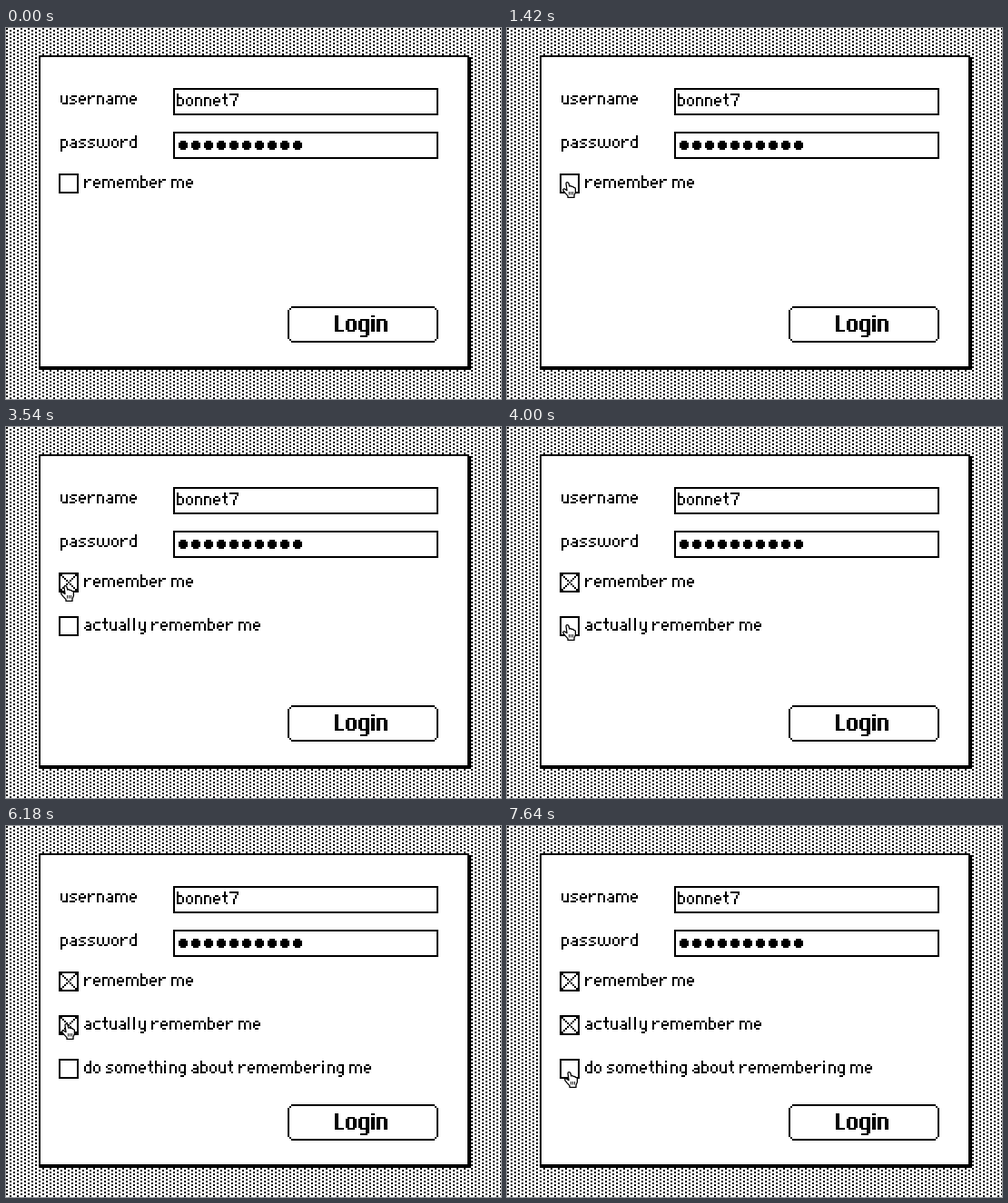
Animation of 545 by 408 pixels, one loop 8000 ms. Source, as an HTML page with a canvas:

```html
<!DOCTYPE html>
<html lang="en">
<head>
<meta charset="utf-8">
<title>Login form</title>
<style>
  html, body { margin: 0; width: 100%; height: 100%; overflow: hidden; background: #fff; }
  canvas { display: block; }
</style>
</head>
<body>
<canvas id="stage" width="545" height="408"></canvas>
<script>
const LOOP = 8000;
const U = 2; // size of one big pixel
const canvas = document.getElementById('stage');
const ctx = canvas.getContext('2d');

// Pixel font built from shared stems, bars, bowls and arches.
// p: pen width, xh: x-height, up: ascender, o: letter width
function makeFont(p, xh, up, o) {
  const last = xh - 1, low = xh + p, mid = xh >> 1;
  const stem = (x, y = 0, end = xh) => [x, y, p, end - y];
  const bar = (x, y, w) => [x, y, w, 1];
  const arch = x => [bar(x + p, 0, o - p - 1), stem(x + o - p, 1)];
  const left = stem(0, 1, last), right = stem(o - p, 1, last);
  const caps = [bar(1, 0, o - 2), bar(1, last, o - 2)];
  const tall = stem(0, -up);
  const cup = [stem(0, 0, last), bar(1, last, o - 2)];
  const tail = [stem(o - p, 0, low), bar(1, low, o - 2)];
  // each glyph: width, then its rectangles
  return {
    xh,
    ' ': [1],
    a: [o, ...caps, stem(o - p, 1), bar(1, mid, o - 2), stem(0, mid + 1, last)],
    b: [o, tall, right, ...caps],
    c: [o, left, bar(1, 0, o - 1), bar(1, last, o - 1)],
    d: [o, left, ...caps, stem(o - p, -up)],
    e: [o, left, ...caps, stem(o - p, 1, mid), bar(0, mid, o)],
    g: [o, left, ...caps, ...tail],
    h: [o, tall, ...arch(0)],
    i: [2, stem(0), [0, -2, p, 1]],
    l: [2, tall],
    m: [2 * o - 1, stem(0), ...arch(0), ...arch(o - 1)],
    n: [o, stem(0), ...arch(0)],
    o: [o, left, right, ...caps],
    p: [o, stem(0, 0, low + 1), right, ...caps],
    r: [o, stem(0), bar(1, 1, 1), bar(2, 0, 2)],
    s: [o, bar(1, 0, 3), bar(0, 1, 1), bar(1, 2, 2), bar(3, 3, 1), bar(0, 4, 3)],
    t: [3, stem(1, -up, last), bar(0, 0, 3), bar(2, last, 1)],
    u: [o, ...cup, stem(o - p)],
    w: [7, stem(0, 0, last), stem(3, 0, last), stem(6, 0, last), bar(1, last, 2), bar(4, last, 2)],
    y: [o, ...cup, ...tail],
    L: [5, tall, bar(p, last, 5 - p)],
    7: [5, bar(0, -up, 5), stem(4, 1 - up, 0), stem(3, 0, 2), stem(2, 2)]
  };
}

const plain = makeFont(1, 5, 2, 4);
const bold = makeFont(2, 7, 2, 6);

function write(text, x, base, font = plain) {
  const top = base - font.xh * U;
  for (const ch of text) {
    const [width, ...parts] = font[ch];
    for (const [px, py, w, h] of parts) ctx.fillRect(x + px * U, top + py * U, w * U, h * U);
    x += (width + 1) * U;
  }
}

function frame(x, y, w, h) {
  ctx.fillRect(x, y, w, h);
  ctx.fillStyle = '#fff';
  ctx.fillRect(x + U, y + U, w - 2 * U, h - 2 * U);
  ctx.fillStyle = '#000';
}

function bullet(x, y) {
  ctx.fillRect(x + U, y, 3 * U, 5 * U);
  ctx.fillRect(x, y + U, 5 * U, 3 * U);
}

// frame with stepped corners
function button(x, y, w, h) {
  for (const far of [0, 1]) {
    ctx.fillRect(x + 2 * U, y + far * (h - U), w - 4 * U, U);
    ctx.fillRect(x + far * (w - U), y + 2 * U, U, h - 4 * U);
    for (const low of [0, 1]) {
      ctx.fillRect(x + U + far * (w - 3 * U), y + U + low * (h - 3 * U), U, U);
    }
  }
}

function checkRow(y, label, checked) {
  frame(58, y, 22, 22);
  if (checked) {
    for (let i = 1; i < 10; i++) {
      ctx.fillRect(58 + i * U, y + i * U, U, U);
      ctx.fillRect(58 + (10 - i) * U, y + i * U, U, U);
    }
  }
  write(label, 86, y + 16);
}

// light grey: every fourth pixel, alternate rows shifted by two
function makeGrey() {
  const tile = document.createElement('canvas');
  tile.width = 4 * U;
  tile.height = 2 * U;
  const c = tile.getContext('2d');
  c.fillStyle = '#fff';
  c.fillRect(0, 0, tile.width, tile.height);
  c.fillStyle = '#000';
  c.fillRect(0, 0, U, U);
  c.fillRect(2 * U, U, U, U);
  return ctx.createPattern(tile, 'repeat');
}
const grey = makeGrey();

const arrowShape = new Path2D('M0 0V13L3 10.2L5.2 15.3L7.4 14.4L5.3 9.5H9.3Z');
const handShape = new Path2D(
  'M4 2Q4 .6 5.3 .6Q6.6 .6 7 2L7.8 5Q9.4 4 10.1 5.5Q11.8 4.8 12.4 6.4Q14.4 6 14.4 8.2' +
  'V11.5L13 15V17.4H6V15.6L3.2 12.6L.8 9.6Q.3 7.6 2.2 7.8L5 9.6Z');
const knuckles = new Path2D('M7.5 11V14.5M9.5 11V14.5M11.5 11V14.5');

const easeOut = k => 1 - (1 - k) ** 2;
const easeInOut = k => k * k * (3 - 2 * k);

const moves = [
  { from: 20, to: 610, a: [-9, 181], b: [67, 169], ease: easeOut, bow: 0 },
  { from: 760, to: 761, a: [67, 169], b: [66, 169], ease: easeOut, bow: 0 },
  { from: 3420, to: 4000, a: [66, 169], b: [66, 217], ease: easeInOut, bow: -4 },
  { from: 6750, to: 7550, a: [66, 217], b: [70, 270], ease: easeInOut, bow: 0 },
  { from: 7610, to: 7611, a: [70, 270], b: [68, 270], ease: easeOut, bow: 0 }
];
const arrowTimes = [[0, 1420], [2200, 2230], [3620, 3980], [5920, 5950], [7020, 7625]];

function cursorAt(t) {
  const m = moves.filter(s => t >= s.from).pop();
  const k = m.ease(Math.min(1, (t - m.from) / (m.to - m.from)));
  const mix = i => m.a[i] + (m.b[i] - m.a[i]) * k;
  return [Math.round(mix(0) + m.bow * Math.sin(Math.PI * k)), Math.round(mix(1))];
}

function drawCursor(t) {
  const [x, y] = cursorAt(t);
  ctx.save();
  ctx.lineJoin = 'round';
  if (arrowTimes.some(([a, b]) => t >= a && t < b)) {
    ctx.translate(x, y);
    ctx.strokeStyle = '#fff';
    ctx.lineWidth = 2;
    ctx.stroke(arrowShape);
    ctx.fill(arrowShape);
  } else {
    ctx.translate(x - 5, y);
    ctx.fillStyle = '#fff';
    ctx.fill(handShape);
    ctx.lineWidth = 1.3;
    ctx.stroke(handShape);
    ctx.lineWidth = 0.9;
    ctx.stroke(knuckles);
  }
  ctx.restore();
}

function draw(t) {
  ctx.fillStyle = grey;
  ctx.fillRect(0, 0, canvas.width, canvas.height);
  ctx.fillStyle = ctx.strokeStyle = '#000';
  ctx.fillRect(38, 32, 474, 344);
  frame(36, 30, 474, 344);

  write('username', 60, 84);
  frame(184, 66, 292, 30);
  write('bonnet7', 188, 86);

  write('password', 60, 132);
  frame(184, 114, 292, 30);
  for (let i = 0; i < 10; i++) bullet(190 + i * 14, 124);

  const first = t >= 2270, second = t >= 6150;
  checkRow(160, 'remember me', first);
  if (first) checkRow(208, 'actually remember me', second);
  if (second) checkRow(256, 'do something about remembering me', false);

  button(310, 306, 166, 40);
  write('Login', 362, 334, bold);

  if (t >= 20) drawCursor(t);
}

const start = performance.now();
function tick() {
  draw((performance.now() - start) % LOOP);
  requestAnimationFrame(tick);
}
tick();
</script>
</body>
</html>
```
